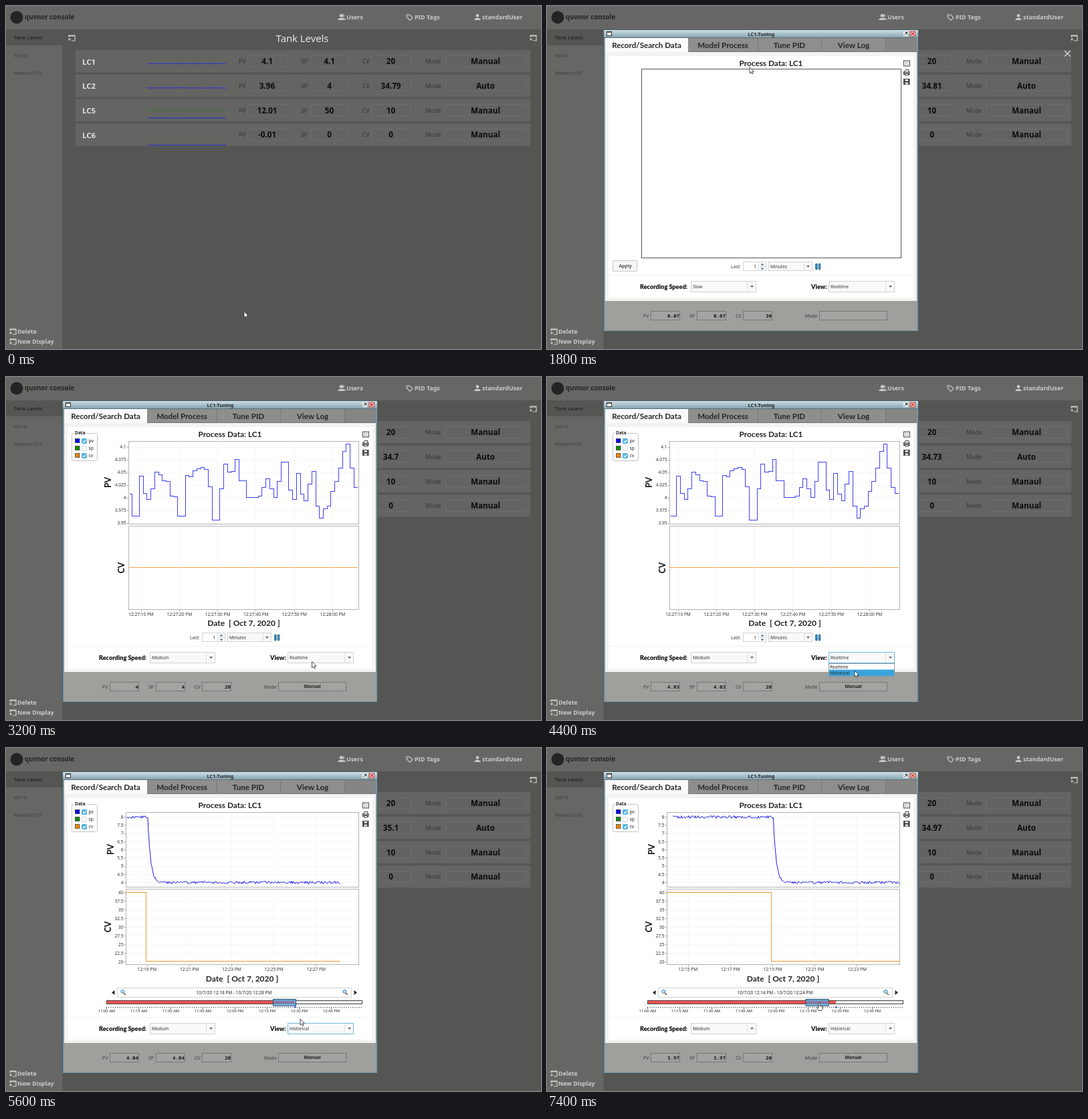
Animation of 800x514 px, one loop 8000 ms. Source, as an HTML page:

```html
<!DOCTYPE html>
<html lang="en">
<head>
<meta charset="utf-8">
<title>Loop tuning</title>
<style>
html, body { margin: 0; width: 100%; height: 100%; overflow: hidden; background: #555553; }
svg { display: block; width: 100vw; height: 100vh; font-family: "Noto Sans", "Open Sans", sans-serif; }
.r { font-family: Lato, sans-serif; font-weight: bold; }
.k { font-family: Lato, sans-serif; font-weight: 900; }
.m { font-family: "Noto Sans Mono", "DejaVu Sans Mono", monospace; font-weight: bold; }
.b { font-weight: bold; }
</style>
</head>
<body>
<svg id="stage" viewBox="0 0 800 514"></svg>
<script>
const LOOP = 8000, STEP = 200;
const CRISP = 'shape-rendering="crispEdges"';
const stage = document.getElementById('stage');
const clamp = v => Math.max(0, Math.min(1, v));
const ease = p => p * p * (3 - 2 * p);
const range = n => [...Array(n).keys()];
const each = (n, f) => range(n).map(f).join('');
const snap = v => Math.floor(v) + 0.5;

// y is the middle of the capitals
function text(x, y, s, size, fill = '#222', cls = '', anchor = 'start') {
  return `<text x="${x}" y="${(y + size * 0.36).toFixed(2)}" font-size="${size}" fill="${fill}" class="${cls}" text-anchor="${anchor}">${s}</text>`;
}
const mid = (x, y, s, size, fill, cls) => text(x, y, s, size, fill, cls, 'middle');
const end = (x, y, s, size, fill, cls) => text(x, y, s, size, fill, cls, 'end');
const upright = (x, y, s) => `<g transform="translate(${x} ${y}) rotate(-90)">${mid(0, 0, s, 12.3, '#111', 'r')}</g>`;
const rect = (x, y, w, h, fill, stroke = 'none', extra = '') =>
  `<rect x="${x}" y="${y}" width="${w}" height="${h}" fill="${fill}" stroke="${stroke}" ${extra}/>`;
const path = (d, stroke = 'none', w = 1, fill = 'none', extra = '') =>
  `<path d="${d}" stroke="${stroke}" stroke-width="${w}" fill="${fill}" ${extra}/>`;
const circle = (x, y, r, fill, stroke = 'none', w = 1) =>
  `<circle cx="${x}" cy="${y}" r="${r}" fill="${fill}" stroke="${stroke}" stroke-width="${w}"/>`;

function noise(i) {
  const v = Math.sin(i * 127.1 + 11.7) * 43758.5453;
  return (v - Math.floor(v)) * 2 - 1;
}

// last entry whose time has come
const held = (list, t) => list.reduce((v, [at, next]) => (t >= at ? next : v), list[0][1]);

const lc2 = [[0, '34.79'], [800, '34.81'], [3000, '34.7'], [4000, '34.73'], [5200, '35.1'], [6800, '34.97']];
const level = [[0, '0.07'], [2000, '4.06'], [2400, '4.02'], [3000, '4'], [4000, '4.03'],
  [5200, '4.04'], [6200, '4.01'], [7000, '3.97']];

const route = [[0, 356, 457.5], [1200, 298, 87], [1400, 303, 91.5], [1800, 303, 91.5], [2400, 304, 421],
  [2800, 262, 440], [3200, 457.5, 426.5], [4000, 468, 423], [4400, 460, 440], [5000, 460, 440],
  [5600, 440, 406], [6200, 420, 381.5], [7400, 407.2, 381.5]];

function pointer(t) {
  let i = 0;
  while (i < route.length - 2 && t >= route[i + 1][0]) i++;
  const [a, x, y] = route[i], [b, u, v] = route[i + 1];
  const lin = clamp((t - a) / (b - a)), p = i === route.length - 2 ? lin : ease(lin);
  return [x + (u - x) * p, y + (v - y) * p];
}

function cursor(t) {
  const [x, y] = pointer(t);
  const shape = t >= 6200
    ? 'M-1 0.5Q0 -1 1 0.5V5L5 6V9Q4.5 11 3.5 12H-1L-4 7.5Q-3.5 6 -1 8Z'
    : 'M0 0V9.3L2.1 7.4 3.5 10.4 5 9.7 3.6 6.8H6.4Z';
  return `<g transform="translate(${x.toFixed(1)} ${y.toFixed(1)})">${path(shape, '#222', 0.8, '#fff')}</g>`;
}

// small window glyph with a badge
const pane = (x, y, c = '#cfcfcd') =>
  path(`M${x - 4} ${y - 1}V${y - 4}H${x + 5}V${y + 4}H${x}M${x - 4} ${y - 3}H${x + 5}`, c, 1.2) +
  path(`M${x - 5} ${y + 2}H${x - 1}M${x - 3} ${y}V${y + 4}`, c, 1.2);

const person = (x, y, c) => circle(x, y - 2.6, 2.3, c) +
  path(`M${x - 4.5} ${y + 4}V${y + 2.5}Q${x} ${y - 1} ${x + 4.5} ${y + 2.5}V${y + 4}Z`, 'none', 0, c);

function header() {
  const c = '#cbcbc9';
  return rect(0, 0, 800, 35, '#666664') + circle(16, 17, 9.5, '#242424') +
    text(28, 17, 'quvnor console', 9.7, '#252525', 'b') +
    person(504, 17, '#a9a9a7') + person(501, 17, c) + text(509, 17, 'Users', 8.9, c, 'b') +
    path('M599 13H603.5L608 17.5 604 21.5 599 16.5Z', c, 1.1) + circle(601.2, 15, 0.7, c) +
    text(611, 17, 'PID Tags', 8.9, c, 'b') +
    person(705, 17, c) + text(712, 17, 'standardUser', 8.9, c, 'b');
}

function sidebar() {
  return rect(0, 35, 84.5, 479, '#666664') + rect(0, 35, 84.5, 24, '#555553') +
    text(12, 47.5, 'Tank Levels', 7.9, '#171717') +
    text(12, 74, 'HX10', 7.9, '#3d3d3c') + text(12, 100, 'Reactor101', 7.9, '#3d3d3c') +
    pane(10, 488) + text(17, 488, 'Delete', 8.9, '#cbcbc9', 'b') +
    pane(10, 503) + text(17, 503, 'New Display', 8.9, '#cbcbc9', 'b');
}

function trace(y, color, wobble) {
  const pts = range(60).map(i => `${211 + i * 2} ${(y + (wobble ? noise(i + y) * 0.4 : 0)).toFixed(1)}`);
  return path('M' + pts.join('L'), color);
}

function rows(t) {
  const early = t < 600, pv = early ? '4.1' : '4.06';
  const data = [
    ['LC1', pv, pv, '20', 'Manual'],
    ['LC2', early ? '3.96' : '3.95', '4', held(lc2, t), 'Auto'],
    ['LC5', '12.01', '50', '10', 'Manaul'],
    ['LC6', '-0.01', '0', '0', 'Manual']];
  const py = pointer(t)[1];
  let out = '';
  data.forEach(([name, ...vals], i) => {
    const top = 66 + 36.7 * i, y = top + 17;
    out += rect(104, top, 680, 33.5, '#646462') + text(114, y + 0.5, name, 11.4, '#e0e0de', 'b');
    [['PV', 348, 361, 61], ['SP', 441, 455, 58], ['CV', 533, 546, 60], ['Mode', 627, 657, 121]].forEach(([tag, x, bx, w], k) => {
      out += text(x, y, tag, 8.7, '#363635') + rect(bx + 0.5, snap(y - 9), w - 1, 17, '#636361', '#71716f', 'stroke-width=".8"') +
        mid(bx + w / 2 - (k ? 0.5 : 1), y, vals[k], 11.7, '#0b0b0b', 'b');
    });
    if (t > 0 && t < 2000 && py >= top && py < top + 33.5) {
      out += circle(108.5, top + 5.5, 4.5, 'none', '#d5d5d3', 1) + path(`M108.5 ${top + 5}V${top + 8}M108.5 ${top + 2.7}V${top + 3.8}`, '#d5d5d3') +
        path(`M774 ${top + 1}l8.5 8.5m0 -8.5l-8.5 8.5`, '#dededc', 1.1);
    }
  });
  const blue = '#2430dc';
  return out + trace(86.3, blue, 1) + trace(122.8, blue, 1) + trace(156.5, '#2c7a2c') + trace(167.8, blue, 1) + trace(208.5, blue);
}

function spinner() {
  return circle(779, 9, 18, '#666664') + circle(779, 9, 16.5, 'none', '#2b2b2b', 3) +
    path('M762.5 9A16.5 16.5 0 0 0 795.5 9A16.5 16.5 0 0 0 762.5 9', '#d2d6d8', 2, 'none', 'stroke-dasharray="4 1.2"');
}

function combo(x, y, w, label, focus) {
  return rect(x + 0.5, y + 0.5, w - 1, 16, '#f9f9f9', focus ? '#6fb9de' : '#d2d2d2') +
    path(`M${x + w - 13.5} ${y + 1}v15`, '#dcdcdc') +
    path(`M${x + w - 9} ${y + 7}h5l-2.5 3z`, 'none', 0, '#666') + text(x + 3, y + 8.5, label, 6.6, '#333');
}

function menu(x, items, on) {
  return rect(x + 0.5, 429.5, 98, items.length * 9 + 1, '#fff', '#8a9aa2') +
    items.map((s, i) => (i === on ? rect(x + 1, 430 + i * 9 - i * 0.5, 97, 9.5, '#3aa4dc') : '') +
      text(x + 2, 434.3 + i * 9, s, 6.6, '#222')).join('');
}

function frame() {
  const tabs = [['Record/Search Data', 149], ['Model Process', 263], ['Tune PID', 362.5], ['View Log', 458.5]];
  return rect(84.5, 35.5, 471, 452, '#7d97a3', '#465a63') +
    '<linearGradient id="bar" x2="0" y2="1"><stop stop-color="#d0dfe5"/><stop offset="1" stop-color="#86a5b2"/></linearGradient>' +
    rect(85, 36, 470, 11, 'url(#bar)') + path('M86 47.5H554', '#5b707a') +
    rect(89.5, 38.5, 7, 6, '#fff', '#333') + path('M89.5 39H96.5', '#333', 1.5) +
    mid(320.5, 42, 'LC1-Tuning', 7.3, '#222', 'b') +
    rect(533, 38, 7, 7, '#e8eef0') + path('M534.5 43.5L538 40M535.5 39.5H538.5V42.5', '#222') +
    rect(543, 38, 7.5, 7, '#f4e9e7', '#c0392b') + path('M544.5 39.5l4.5 4m0 -4l-4.5 4', '#d02020', 1.3) +
    rect(87, 48, 466, 21, '#8e8e8c') + rect(506, 48, 47, 21, '#858583') +
    path('M315.5 48V69M410.5 48V69M506.5 48V69M211 68.5H553', '#777775') + rect(87, 48, 124, 21, '#fafafa') +
    tabs.map(([s, x]) => mid(x, 58.5, s, 11.6, '#262626', 'r')).join('') +
    rect(87, 69, 466, 374, '#f3f3f2') + rect(92, 75, 456, 362, '#fff') + path('M92 403.5H548', '#f1f1f1') +
    rect(87, 442, 466, 44, '#9f9f9c');
}

function footer(t) {
  const v = held(level, t), blank = t < 2000;
  const box = (x, w) => rect(x + 0.5, 457.5, w - 1, 13, '#a3a3a0', '#777775');
  return [['PV', 144, 155, v], ['SP', 213, 224, v], ['CV', 282, 293, blank ? '30' : '20']].map(([tag, x, bx, s]) =>
    text(x, 464.5, tag, 6.9, '#3d3d3c') + box(bx, 44) + end(bx + 43, 464.5, s, 7.5, '#1c1c1c', 'm')).join('') +
    text(386, 464.5, 'Mode', 6.8, '#3d3d3c') + box(407, 102) + (blank ? '' : mid(458, 464, 'Manual', 6.7, '#222', 'b'));
}

function tools() {
  const c = '#444';
  return rect(533.5, 82, 9, 8, '#fff', c) + path('M535.5 84h1.5m2 0h1.5M535.5 88h1.5m2 0h1.5M538 85.5v1', c, 1.2) +
    rect(533.5, 98.5, 8.5, 4, '#888', c) + path('M535 98.5L536 95.5H541L540.5 98.5M535.5 101.5H540.5V104H535.5Z', c, 1, '#fff') +
    rect(533.5, 109.5, 8.5, 8, '#444', c) + rect(535.5, 110, 4.5, 2.5, '#eee') + rect(535.5, 114.5, 4.5, 3, '#ddd');
}

function legend() {
  return rect(98.5, 84.5, 38, 41, '#fff', '#c4c4c4', 'rx="2"') + rect(102, 82, 18, 4, '#fff') +
    text(103, 84, 'Data', 6.6, '#222', 'b') +
    [['pv', '#0505ee', 1], ['sp', '#0c8a0c', 0], ['cv', '#ee860c', 1]].map(([s, c, on], i) => {
      const y = 95.5 + 11 * i;
      return rect(103.5, y - 3, 6.5, 6, c, '#333', 'stroke-width=".7"') +
        rect(113.5, y - 3, 7, 7, on ? '#55b6e8' : '#fff', on ? '#4fabdb' : '#d4d4d4', 'rx="1"') +
        (on ? path(`M115 ${y + 0.5}l1.7 1.8 2.8 -3.5`, '#fff', 1.2) : '') + text(123.5, y, s, 6.8, '#222');
    }).join('');
}

function plot(x, y, w, h, ys, labels, xs) {
  const dash = 'stroke-dasharray="2 2"';
  return rect(x, y, w, h, '#fff', '#b2b2b2') +
    ys.map((v, i) => path(`M${x} ${snap(v)}h${w}`, '#ededed', 1, 'none', dash) + path(`M${x - 3} ${snap(v)}h3`, '#aaa') +
      end(x - 4, v, labels[i], 6.6, '#333')).join('') +
    xs.map(v => path(`M${snap(v)} ${y}v${h}`, '#ededed', 1, 'none', dash)).join('');
}

const timeAxis = (y, ticks) => ticks.map(([x, s]) => path(`M${snap(x)} ${y}v3`, '#aaa') + mid(x, y + 7, s, 6.55, '#333')).join('');
const dateLabel = (x, y) => mid(x, y, 'Date\u00a0 [ Oct 7, 2020 ]', 12, '#222', 'r');

// plot heights of the live samples, one per second
const live = [176, 209, 209, 149, 175, 184, 168, 143, 147, 156, 157, 179, 180, 209, 209, 148, 150, 141, 138, 136, 139,
  165, 215, 215, 168, 131, 143, 142, 124, 156, 156, 181, 181, 181, 179, 166, 153, 168, 181, 157, 128, 128, 170, 184,
  145, 176, 186, 161, 142, 194, 212, 198, 194, 172, 157, 137, 112, 101, 137, 166, 175];

function liveChart(t) {
  const gap = 5.73, k = Math.floor((t - 3100) / 1000), last = 59 + k;
  const ticks = range(6).map(i => [202 + i * 57.3 - 6 * k, i < 5 ? `12:27:${i + 1}0 PM` : '12:28:00 PM']);
  let d = '';
  for (let n = -1; n <= last; n++) {
    const a = Math.max(184, 182.3 + gap * (n - k)), b = n === last ? 525.5 : 182.3 + gap * (n + 1 - k);
    if (b <= 184) continue;
    d += (d ? 'L' : 'M') + `${snap(a)} ${snap(live[Math.max(0, n)] - 0.5)}H${snap(b)}`;
  }
  const xs = ticks.map(v => v[0]);
  return plot(183.5, 96.5, 344, 124, range(7).map(i => 105 + 19 * i), ['4.1', '4.075', '4.05', '4.025', '4', '3.975', '3.95'], xs) +
    plot(183.5, 223.5, 344, 125, [], [], xs) + path(d, '#4040f4', 1, 'none', CRISP) + path('M184 285.5H525.5', '#eea648', 1, 'none', CRISP) +
    upright(152.5, 158, 'PV') + upright(173, 286, 'CV') + timeAxis(348.5, ticks) + dateLabel(355.5, 369);
}

function history(t) {
  const back = 4 * clamp((t - 6200) / 1200), rate = 31.6;
  const at = m => 211 + rate * (m - 19 + back);
  const ticks = range(9).map(i => 13 + 2 * i).filter(m => at(m) > 190 && at(m) < 515).map(m => [at(m), `12:${m} PM`]);
  const stop = Math.min(527.5, at(28.14)), fall = at(19) + 1, cut = at(19) - 2;
  const pts = [];
  for (let i = -120; i < 290; i++) {
    const x = fall + i * 1.25;
    if (x < 180 || x > stop) continue;
    const y = (i < 0 ? 103.5 : 201.5 - 98 * Math.exp(-i * 1.25 / 4.2)) + noise(i) * 2.1;
    pts.push(`${x.toFixed(1)} ${y.toFixed(1)}`);
  }
  const xs = ticks.map(v => v[0]), from = Math.round(18 - back);
  return plot(179.5, 96.5, 348, 112, range(9).map(i => 103.5 + 12.25 * i), range(9).map(i => 8 - i / 2), xs) +
    plot(179.5, 211.5, 348, 113, range(9).map(i => 217 + 12.9 * i), range(9).map(i => 40 - 2.5 * i), xs) +
    path('M' + pts.join('L'), '#1c1cee') + path(`M180 216.5H${snap(cut)}V319.5H${stop}`, '#eea030', 1, 'none', CRISP) +
    upright(156.5, 152, 'PV') + upright(152.5, 268, 'CV') + timeAxis(324.5, ticks) + dateLabel(353, 345.5) +
    picker(back, `10/7/20 12:${from} PM - 10/7/20 12:${from + 10} PM`);
}

const lens = x => path(`M${x + 1} ${367}l3 3`, '#8a5a2a', 1.6) + circle(x - 0.7, 365, 2.5, '#bfe2f5', '#3683b8', 1);

function picker(back, label) {
  const x = 399.5 - 3.1 * back;
  return rect(166.5, 359.5, 350, 14, '#fff', '#d2d2d2') + lens(175) + lens(507) +
    path('M162.5 363v7l-4.5 -3.5zM520.5 363v7l4.5 -3.5z', 'none', 0, '#222') + mid(341, 366.5, label, 6.55, '#222') +
    rect(150.5, 378.5, 382, 5, '#f1f1f1', '#444') + rect(151, 379, 281, 4, '#fa5050') +
    rect(x, 376.5, 34, 10, '#58a6e2', '#24506e', 'fill-opacity=".72"') +
    path(`M${x + 2} 381.5h30`, '#a8577c', 2.5, 'none', 'stroke-dasharray="1.5 1.5"') +
    each(120, i => path(`M${150.5 + i * 3.2} 388v${i % 15 ? 1.5 : 3}`, '#333', 0.9)) +
    rect(431, 387.5, 2.5, 2, '#3030e0') +
    each(8, i => mid(150.5 + i * 48, 394, `${i < 4 ? 11 : 12}:${['00', 15, 30, 45][i % 4]} ${i < 4 ? 'AM' : 'PM'}`, 5.8, '#222'));
}

function span() {
  const tube = x => rect(x, 386, 2.6, 9, '#3a86b4', '#1f5a80', 'rx="1" stroke-width=".8"');
  return text(275, 390.5, 'Last:', 6.7, '#333') + rect(293.5, 383.5, 34, 13, '#fff', '#d2d2d2') + end(313, 390.5, '1', 6.7, '#222') +
    path('M316.5 384V396M316.5 390.5H327', '#dcdcdc') + path('M319.5 388.5h5l-2.5 -3zM319.5 392.5h5l-2.5 3z', 'none', 0, '#556f88') +
    rect(331.5, 383.5, 65, 13, '#f9f9f9', '#d2d2d2') + path('M384.5 384V396', '#dcdcdc') +
    path('M388 389h5l-2.5 3z', 'none', 0, '#666') + text(334, 390.5, 'Minutes', 6.6, '#333') +
    tube(401.6) + tube(406.2) + rect(403.5, 389, 3.5, 1.5, '#6fb6dc');
}

function dialog(t) {
  const past = t >= 4800;
  let out = frame() + mid(335, 86, 'Process Data: LC1', 11.8, '#222', 'r') + tools();
  if (t < 2000) {
    out += rect(141.5, 94.5, 388, 283, '#fff', '#555') + rect(98.5, 381.5, 36, 16, '#f6f6f6', '#c8c8c8', 'rx="1"') +
      mid(117, 389.5, 'Apply', 6.8, '#555', 'b');
  } else {
    out += legend() + (past ? history(t) : liveChart(t));
  }
  if (!past) out += span();
  out += text(139, 420.5, 'Recording Speed:', 9.1, '#111', 'k') + combo(215, 412, 98, t < 2800 ? 'Slow' : 'Medium', t >= 2400 && t < 3000) +
    text(395, 420.5, 'View:', 9.1, '#111', 'k') + combo(421, 412, 99, past ? 'Historical' : 'Realtime', t >= 4000 && t < 6400) + footer(t);
  if (t >= 2400 && t < 2800) out += menu(215, ['Slow', 'Medium', 'Fast'], t < 2600 ? 0 : 1);
  if (t >= 4000 && !past) out += menu(421, ['Realtime', 'Historical'], t < 4200 ? 0 : 1);
  return out;
}

function draw(t) {
  stage.innerHTML = rect(0, 0, 800, 514, '#555553') + header() + sidebar() +
    pane(98, 48) + pane(788, 48) + mid(443, 48.5, 'Tank Levels', 14.8, '#e6e6e4') + rows(t) +
    (t >= 1400 && t < 1800 ? spinner() : '') + (t >= 1800 ? dialog(t) : '') + cursor(t);
}

let shown = -1;
function tick() {
  const t = Math.floor(performance.now() % LOOP / STEP) * STEP;
  if (t !== shown) draw(shown = t);
  requestAnimationFrame(tick);
}
tick();
</script>
</body>
</html>
```
